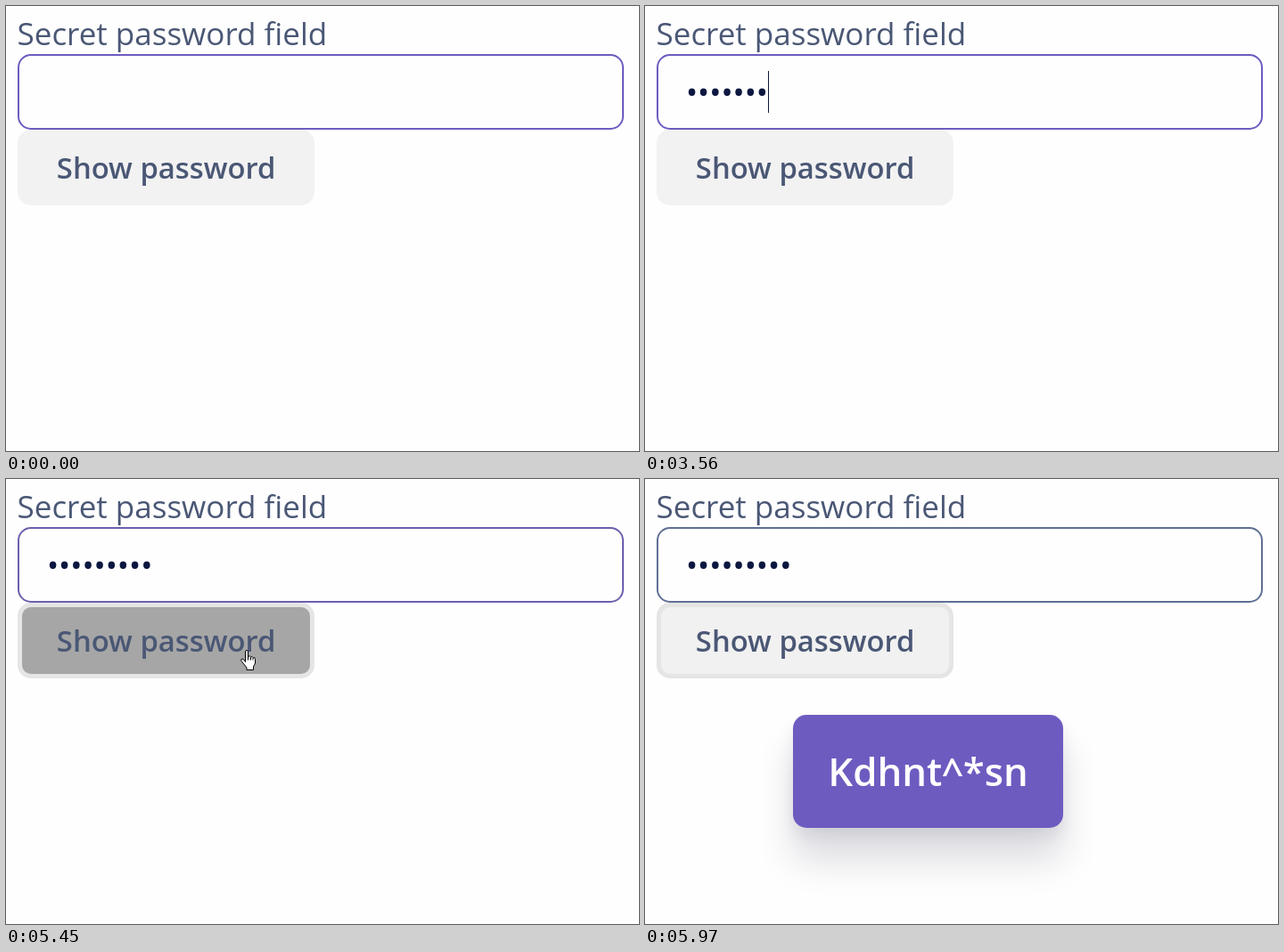
Recreate the animation shown at these times as an HTML page with a canvas. Size 710 by 500 pixels, loop 8000 ms.

```html
<!DOCTYPE html>
<html lang="en">
<head>
<meta charset="utf-8">
<title>Show password</title>
<style>
  html, body { margin: 0; width: 100%; height: 100%; overflow: hidden; background: #fefefe; }
  canvas { display: block; }
</style>
</head>
<body>
<canvas id="stage" width="710" height="500"></canvas>
<script>
const ctx = document.getElementById('stage').getContext('2d');
const LOOP = 8000;
const FONT = '"Open Sans", "Noto Sans", sans-serif';
const SLATE = '#4a5775', NAVY = '#0c1740', PURPLE = '#6e5bc0';

// Each step changes part of the state and holds until the next one.
const start = {
  dots: 0, caret: false, field: PURPLE, fill: '#f2f2f2', edge: '#f2f2f2',
  tip: 0, cursor: null
};
const steps = [
  [410, { caret: true }],
  [810, { caret: false }],
  [1370, { dots: 1, caret: true }],
  [1490, { dots: 2 }],
  [1640, { dots: 3 }],
  [1910, { dots: 4 }],
  [2410, { dots: 5 }],
  [2720, { dots: 6 }],
  [3310, { caret: false }],
  [3560, { dots: 7, caret: true }],
  [3960, { dots: 8 }],
  [4110, { dots: 9 }],
  [4670, { caret: false }],
  [4940, { cursor: [arrow, 413, 182] }],
  [5060, { cursor: [hand, 284, 191], edge: '#ebebeb' }],
  [5180, { cursor: [hand, 263, 192], edge: '#e5e5e5', caret: true }],
  [5450, { caret: false, fill: '#a6a6a6', field: '#6c60ad' }],
  [5570, { fill: '#cccccc', field: '#5f7095', tip: 0.3 }],
  [5720, { fill: '#dfdfdf', tip: 0.65 }],
  [5850, { fill: '#ebebeb', tip: 0.88, cursor: [arrow, 670, 170] }],
  [5970, { fill: '#f1f1f1', tip: 1, cursor: null }]
];

function stateAt(t) {
  const state = { ...start };
  for (const [time, change] of steps) if (t >= time) Object.assign(state, change);
  return state;
}

function box(x, y, w, h, r, color) {
  ctx.beginPath();
  ctx.roundRect(x, y, w, h, r);
  ctx.fillStyle = color;
  ctx.fill();
}

function text(str, x, y, size, weight, color, align = 'left') {
  ctx.font = `${weight} ${size}px ${FONT}`;
  ctx.textAlign = align;
  ctx.fillStyle = color;
  ctx.fillText(str, x, y);
}

function drawField({ dots, caret, field }) {
  ctx.beginPath();
  ctx.roundRect(14, 55, 678, 83, 14);
  ctx.lineWidth = 2;
  ctx.strokeStyle = field;
  ctx.stroke();
  text('•'.repeat(dots), 45.9, 110, 35, 400, NAVY);
  if (caret) {
    ctx.fillStyle = NAVY;
    ctx.fillRect(Math.floor(46.6 + dots * 13.11), 73, 1, 47);
  }
}

function drawButton({ fill, edge }) {
  box(13, 139, 333, 85, 15, edge);
  box(18, 144, 323, 75, 10, fill);
  text('Show password', 179.7, 194, 32.8, 600, SLATE, 'center');
}

// Shadow only, cast by a box far outside the stage.
function shadow(x, y, w, h, drop, blur, color) {
  const away = 2000;
  ctx.shadowColor = color;
  ctx.shadowBlur = blur;
  ctx.shadowOffsetX = away;
  ctx.shadowOffsetY = drop;
  box(x - away, y, w, h, 15, '#000');
}

function drawTip({ tip }) {
  if (!tip) return;
  const rect = [166, 265, 303, 127];
  ctx.save();
  ctx.globalAlpha = tip;
  ctx.save();
  ctx.beginPath();
  ctx.rect(0, 0, 710, 500);
  ctx.roundRect(...rect, 15);
  ctx.clip('evenodd');
  shadow(...rect, 36, 40, 'rgba(24, 30, 60, 0.15)');
  shadow(...rect, 8, 16, 'rgba(24, 30, 60, 0.08)');
  ctx.restore();
  box(...rect, 15, PURPLE);
  ctx.restore();
  text('Kdhnt^*sn', 317.5, 345, 43.75, 600, '#fff', 'center');
}

function outline(path) {
  const shape = new Path2D(path);
  ctx.lineWidth = 1;
  ctx.lineJoin = 'round';
  ctx.fillStyle = '#fff';
  ctx.strokeStyle = '#000';
  ctx.fill(shape);
  ctx.stroke(shape);
}

function arrow() {
  outline('M.5 .5V16.5L4.2 13L6.6 18.5L9.2 17.4L6.9 12H11.8Z');
}

function hand() {
  outline('M5.5 13.5V2Q5.5 .5 7 .5T8.5 2V7.5Q10.7 6 11.5 8Q13.5 6.8 14.2 8.8' +
    'Q16.5 8 16.5 10.5V15L14.5 19V22.5H7V20L1 12.5Q0 10.5 2 10Q3.5 10 5.5 13.5Z');
  ctx.stroke(new Path2D('M8.5 7V11.5M11.5 8V11.5M14 9V11.5'));
}

function drawCursor({ cursor }) {
  if (!cursor) return;
  const [shape, x, y] = cursor;
  ctx.save();
  ctx.translate(x, y);
  shape();
  ctx.restore();
}

function draw(t) {
  const state = stateAt(t);
  ctx.fillStyle = '#fefefe';
  ctx.fillRect(0, 0, 710, 500);
  text('Secret password field', 12.6, 44, 35, 400, SLATE);
  drawField(state);
  drawButton(state);
  drawTip(state);
  drawCursor(state);
}

let origin;
function tick(now) {
  origin ??= now;
  draw((now - origin) % LOOP);
  requestAnimationFrame(tick);
}
draw(0);
requestAnimationFrame(tick);
</script>
</body>
</html>
```
